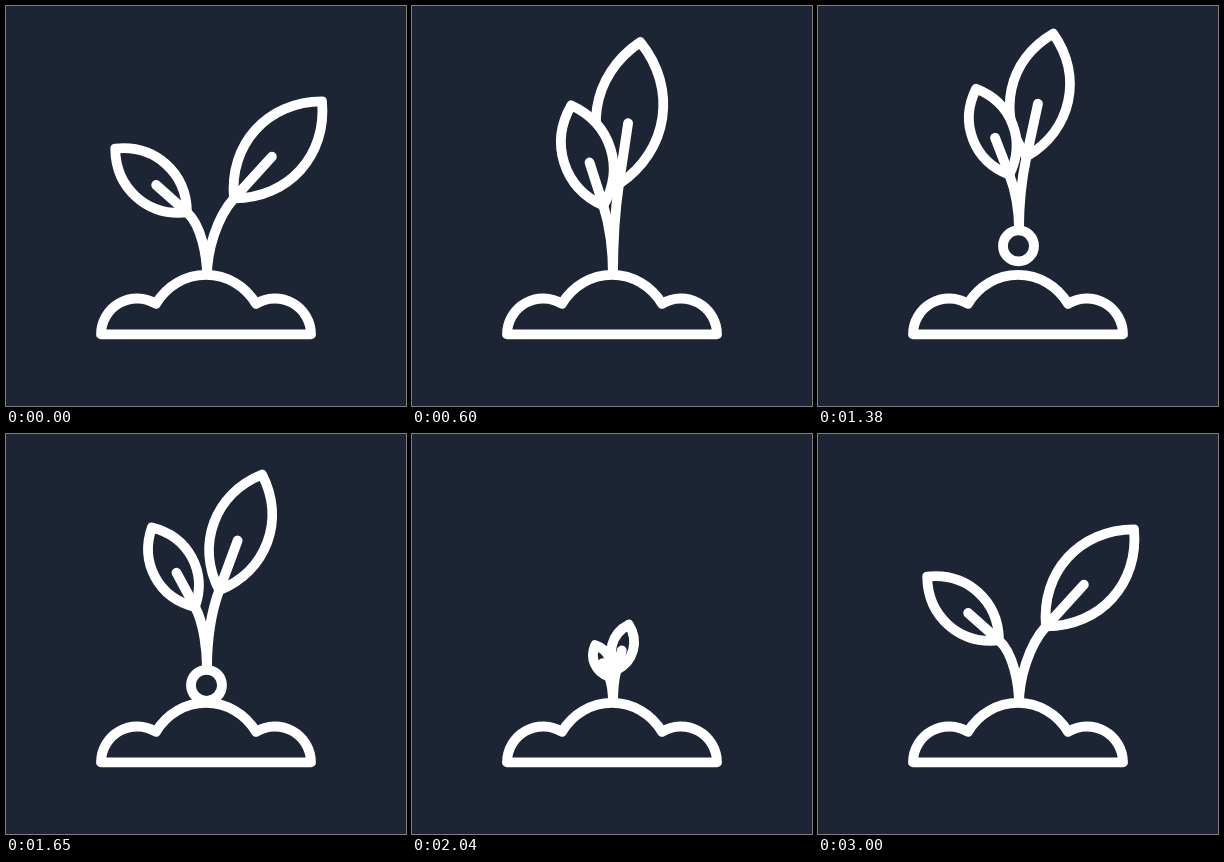
An HTML page with a canvas for the animation above (5.63 s loop, 400 px wide and 400 px high).

```html
<!DOCTYPE html>
<html lang="en">
<head>
<meta charset="utf-8">
<title>Sprout</title>
<style>
html, body { margin: 0; width: 100%; height: 100%; overflow: hidden; background: #1d2433; }
canvas { display: block; width: 100vw; height: 100vh; }
</style>
</head>
<body>
<canvas id="stage" width="400" height="400"></canvas>
<script>
const ctx = document.getElementById('stage').getContext('2d');
const LOOP = 5630, STEP = 30;
const INK = '#fff', SOIL = '#1d2433';
const STEM_X = 201, ROOT_Y = 270;
const mound = new Path2D('M95 328A36 36 0 0 1 150 297.5A57.6 57.6 0 0 1 250 297.5A36 36 0 0 1 305 328Z');

const progress = (t, start, end) => Math.min(1, Math.max(0, (t - start) / (end - start)));
const smooth = (t, start, end) => {
  const u = progress(t, start, end);
  return u * u * (3 - 2 * u);
};

// spread: how far the leaves open; size: leaf scale; stem: stem scale; root: its y
function uprooted(t) {
  const pull = smooth(t, 0, 680), pop = smooth(t, 600, 1000), settle = smooth(t, 1080, 1740);
  return {
    spread: 1 - 0.83 * pull - 0.04 * pop + 0.37 * settle,
    size: 1 + 0.1 * pull - 0.125 * pop - 0.035 * settle,
    stem: 1 + 0.19 * pull - 0.31 * pop + 0.14 * settle,
    root: ROOT_Y - 56 * pop + 22 * settle
  };
}

function regrown(t) {
  const size = 1 - (1 - progress(t, 1845, 2910)) ** 2.2;
  return { spread: size, size, stem: size ** 0.8, root: ROOT_Y };
}

function drawLeaf(baseX, baseY, length, degrees, root) {
  const angle = degrees * Math.PI / 180;
  const dx = length * Math.sin(angle), dy = -length * Math.cos(angle);
  const point = (along, side) => [baseX + dx * along - dy * side, baseY + dy * along + dx * side];
  const bulge = 0.307;

  ctx.beginPath();
  ctx.moveTo(baseX, baseY);
  ctx.bezierCurveTo(...point(0.28, bulge), ...point(0.72, bulge), ...point(1, 0));
  ctx.bezierCurveTo(...point(0.72, -bulge), ...point(0.28, -bulge), baseX, baseY);
  ctx.closePath();
  ctx.fill();
  ctx.stroke();

  // Vein running on into the stem
  ctx.beginPath();
  ctx.moveTo(...point(0.43, 0));
  ctx.lineTo(baseX, baseY);
  ctx.bezierCurveTo(...point(-0.2, 0), STEM_X, root - 0.32 * (root - baseY), STEM_X, root);
  ctx.stroke();
}

function drawPlant({ spread, size, stem, root }) {
  const rightY = root - 78 * stem;
  const leftY = rightY + (21 - 7 * spread) * size;
  drawLeaf(STEM_X + 27 * spread * size, rightY, 131 * size, 42.2 * spread, root);
  drawLeaf(STEM_X - (6 + 14 * spread) * size, leftY, 96 * size, -10 - 38.4 * spread, root);
  ctx.beginPath();
  ctx.arc(200.5, root + 16, 15.5, 0, 2 * Math.PI);
  ctx.fill();
  ctx.stroke();
}

function drawCrumbs(t) {
  const u = (t - 600) / 720;
  if (u <= 0 || u > 1) return;
  ctx.fillStyle = INK;
  for (const [reach, rise] of [[99, 335], [57, 584]]) {
    for (const side of [-1, 1]) {
      ctx.beginPath();
      ctx.arc(204 + side * reach * u, 272 - rise * u + (rise + 16) * u * u, 7.5, 0, 2 * Math.PI);
      ctx.fill();
    }
  }
}

function draw(t) {
  ctx.setTransform(1, 0, 0, 1, 0, 0);
  ctx.fillStyle = SOIL;
  ctx.fillRect(0, 0, 400, 400);
  ctx.translate(0, 0.4);
  ctx.strokeStyle = INK;
  ctx.lineWidth = 9.8;
  ctx.lineCap = ctx.lineJoin = 'round';
  drawCrumbs(t);
  ctx.fillStyle = SOIL;
  if (t > 1845) drawPlant(regrown(t));
  if (t < 2010) {
    const flight = 290 * progress(t, 1740, 1980) ** 2;
    ctx.save();
    ctx.translate(flight, -flight);
    drawPlant(uprooted(t));
    ctx.restore();
  }
  ctx.fill(mound);
  ctx.stroke(mound);
}

function tick() {
  const t = performance.now() % LOOP;
  draw(Math.floor(t / STEP) * STEP);
  requestAnimationFrame(tick);
}
tick();
</script>
</body>
</html>
```
